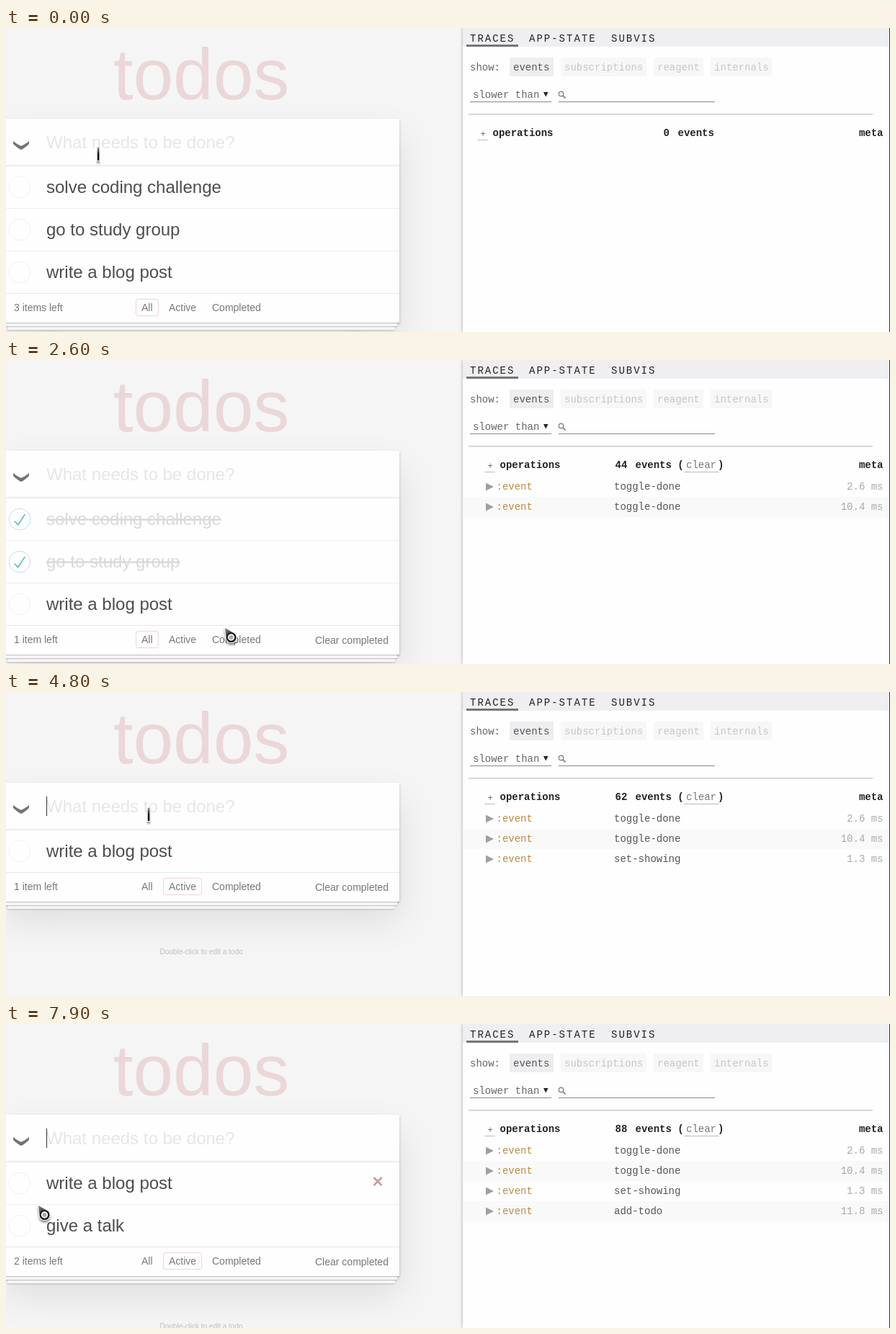
An HTML page that plays this animation: 1227x422 px, repeating every 8000 ms.

```html
<!DOCTYPE html>
<html lang="en">
<head>
<meta charset="utf-8">
<title>todos</title>
<style>
html, body { margin: 0; width: 100%; height: 100%; overflow: hidden; background: #f5f5f5; }
#stage { position: absolute; left: 0; top: 0; width: 1227px; height: 422px; overflow: hidden; background: #f5f5f5; }
#card { position: absolute; left: -4px; top: 126px; width: 550px; background: #fefefe;
  box-shadow: 0 2px 4px rgba(0,0,0,.2), 0 25px 50px rgba(0,0,0,.1); }
#card::before { content: ""; position: absolute; left: 0; right: 0; bottom: 0; height: 50px;
  box-shadow: 0 1px 1px rgba(0,0,0,.2), 0 8px 0 -3px #f6f6f6, 0 9px 1px -3px rgba(0,0,0,.2),
    0 16px 0 -6px #f6f6f6, 0 17px 2px -6px rgba(0,0,0,.2); }
#entry { position: relative; height: 65px; background: #fefefe; box-shadow: inset 0 -2px 1px rgba(0,0,0,.03); }
#panel { position: absolute; left: 634px; top: 0; width: 592px; height: 422px; background: #fefefe;
  border-right: 1px solid #333; box-shadow: 0 0 4px rgba(0,0,0,.35); }
#tabs { height: 26px; background: #efeef1; }
#rule { position: absolute; left: 7px; top: 110px; width: 563px; height: 9px;
  box-shadow: 0 2px 2px -1px rgba(0,0,0,.3); }
svg { position: absolute; left: 0; top: 0; }
text { font: 14px "Liberation Sans", Arial, sans-serif; white-space: pre; }
text.big { font-size: 24px; }
text.mono { font-family: "Liberation Mono", "Courier New", monospace; }
text.bold { font-weight: bold; }
</style>
</head>
<body>
<div id="stage">
  <div id="card"><div id="entry"></div></div>
  <div id="panel"><div id="tabs"></div><div id="rule"></div></div>
  <svg width="1227" height="422" viewBox="0 0 1227 422">
    <defs>
      <linearGradient id="drop" x1="0" y1="0" x2=".6" y2="1">
        <stop offset="0" stop-color="#8a8a8a"/><stop offset=".7" stop-color="#222"/>
      </linearGradient>
      <linearGradient id="beam" x1="0" y1="0" x2="0" y2="1">
        <stop offset="0" stop-color="#999"/><stop offset=".5" stop-color="#111"/>
      </linearGradient>
      <filter id="shade" x="-60%" y="-40%" width="220%" height="200%">
        <feDropShadow dx="0" dy="2.5" stdDeviation="1.5" flood-opacity=".5"/>
      </filter>
    </defs>
    <g id="fixed"></g>
    <g id="live"></g>
  </svg>
</div>
<script>
const LOOP = 8000, STEP = 100;
const $ = id => document.getElementById(id);

const text = (x, y, s, fill, cls = '', extra = '') =>
  `<text x="${x}" y="${y}" fill="${fill}" class="${cls}" ${extra}>${s}</text>`;
const mono = (x, y, s, fill, extra = '') => text(x, y, s, fill, 'mono', extra);
const bold = (x, y, s, extra = '') => text(x, y, s, '#222', 'mono bold', extra);
const rect = (x, y, w, h, fill, extra = '') =>
  `<rect x="${x}" y="${y}" width="${w}" height="${h}" fill="${fill}" ${extra}/>`;
const path = (d, fill, extra = '') => `<path d="${d}" fill="${fill}" ${extra}/>`;
const dots = (x1, x2) =>
  path(`M${x1} 155.5H${x2}`, 'none', 'stroke="#777" stroke-dasharray="1 1"');
const END = 'text-anchor="end"';

// Pointer moves: start, end, target
const moves = [
  [0, 700, 23, 224],
  [1000, 1600, 23, 280],
  [1800, 2300, 304, 372],
  [2600, 3100, 259, 390],
  [4100, 4600, 198, 170],
  [7400, 7900, 45, 252]
];
const traces = [
  [1000, 'toggle-done', '2.6 ms'],
  [1800, 'toggle-done', '10.4 ms'],
  [3500, 'set-showing', '1.3 ms'],
  [5400, 'add-todo', '11.8 ms']
];
const counts = [[0, 0], [1000, 22], [1800, 44], [3500, 62], [5000, 73], [5400, 88]];
const todos = [
  { name: 'solve coding challenge', done: 1000, to: 3500 },
  { name: 'go to study group', done: 1800, to: 3500 },
  { name: 'write a blog post' },
  { name: 'give a talk', from: 5400 }
];
const filters = [['All', 188, 180, 32], ['Active', 226, 218, 54], ['Completed', 286, 278, 84]];

function pointer(t) {
  let x = 128, y = 175;
  for (const [a, b, tx, ty] of moves) {
    const p = Math.min(1, Math.max(0, (t - a) / (b - a)));
    const e = p * p * (3 - 2 * p);
    x += (tx - x) * e;
    y += (ty - y) * e;
  }
  return { x, y, hot: y - 3 };
}

function drawFixed() {
  let s = text(148.7, 99, 'todos', '#ebd7d7', '', 'style="font-size:100px"');
  s += path('M10 157Q17 162.5 21 163.7Q25 162.5 32 157V161Q25 167.5 21 169Q17 167.5 10 161Z', '#737373');
  [['TRACES', 644], ['APP-STATE', 726], ['SUBVIS', 840]].forEach(([name, x]) => {
    s += mono(x, 19, name, '#222', 'letter-spacing="2"');
  });
  s += rect(639, 23, 72, 3, '#767676') + mono(644, 59, 'show:', '#666');
  [['events', 699, 61], ['subscriptions', 770, 119], ['reagent', 899, 69], ['internals', 978, 85]]
    .forEach(([name, x, w], i) => {
      s += rect(x, 41, w, 26, i ? '#f7f7f7' : '#eeeef0') + mono(x + 5, 59, name, i ? '#c6c6c6' : '#555');
    });
  s += mono(648, 97, 'slower than', '#666') + path('M746 89h6.5l-3.25 6.5z', '#222');
  s += rect(644, 102, 113, 1, '#888') + rect(767, 102, 217, 1, '#888');
  s += '<circle cx="770.5" cy="91.5" r="3.2" fill="none" stroke="#888" stroke-width="1.4"/>';
  s += path('M773 94l3.5 3.5', 'none', 'stroke="#888" stroke-width="1.8"');
  s += bold(1217.5, 150, 'meta', END);
  $('fixed').innerHTML = s;
}

function drawEntry(t) {
  const typed = t >= 5000 && t < 5400;
  let s = typed
    ? text(56, 167, 'give a talk', '#4d4d4d', 'big')
    : text(56, 167, 'What needs to be done?', '#e6e6e6', 'big', 'font-style="italic"');
  const lit = t >= 5400 ? Math.floor((t - 5400) / 600) % 2 === 0 : t >= 4800;
  if (lit) s += rect(typed ? 164 : 56, 145, 1, 27, '#333');
  return s;
}

function drawRow(todo, i, t, hover) {
  const top = 192 + 59 * i, mid = top + 29;
  const done = t >= todo.done;
  const fade = done ? [.28, .68, .89, 1][Math.min(3, (t - todo.done) / STEP)] : 0;
  const c = Math.round(77 + 140 * fade);
  let s = rect(0, top - 1, 546, 1, i ? '#ededed' : '#e6e6e6');
  s += `<g transform="translate(4.2 ${mid - 14.7}) scale(.2963)">` +
    `<circle cx="50" cy="50" r="50" fill="none" stroke="${done ? '#bddad5' : '#ededed'}" stroke-width="3"/>` +
    (done ? path('M72 25L42 71 27 56l-4 4 20 20 34-52z', '#5dc2af') : '') + '</g>';
  s += text(56, top + 37, todo.name, `rgb(${c},${c},${c})`, 'big', done ? 'text-decoration="line-through"' : '');
  if (hover) s += path(`M510.5 ${mid - 8}l11 11m0-11l-11 11`, 'none', 'stroke="#cc9a9a" stroke-width="2.6"');
  return s;
}

function drawFooter(t, n, left, ptr) {
  const top = 191 + 59 * n;
  let s = rect(0, top, 546, 1, '#e6e6e6');
  s += text(11, top + 25, `${left} item${left === 1 ? '' : 's'} left`, '#777');
  filters.forEach(([name, x, bx, w], i) => {
    const on = i === (t >= 3500 ? 1 : 0);
    const over = ptr.x >= bx && ptr.x < bx + w && ptr.hot >= top + 8 && ptr.hot < top + 32;
    if (on || over) {
      s += rect(bx + .5, top + 8.5, w - 1, 23, 'none',
        `rx="3" stroke="rgba(175,47,47,${on ? .2 : .1})"`);
    }
    s += text(x, top + 25, name, '#777');
  });
  if (t >= 1000) s += text(429, top + 26, 'Clear completed', '#777');
  s += text(213.5, top + 114, 'Double-click to edit a todo', '#bfbfbf', '', 'style="font-size:10px"');
  return s;
}

function drawTraces(t) {
  const rows = traces.filter(r => t >= r[0]);
  const layout = Math.min(2, rows.length);
  const op = [676, 688, 686][layout], num = [913, 851, 846][layout];
  const count = counts.filter(c => t >= c[0]).pop()[1];
  const ev = num + (count ? 28 : 20);
  let s = mono(op - 17.5, 151, '+', '#666', 'style="font-size:12px"') + dots(op - 21, op - 7);
  s += bold(op - .5, 150, 'operations') + bold(num - .5, 150, count);
  s += bold(ev - .5, 150, count ? 'events (' : 'events');
  if (count) {
    s += mono(ev + 70, 150, 'clear', '#777') + dots(ev + 68, ev + 115) + bold(ev + 114, 150, ')');
  }
  rows.forEach(([, name, ms], i) => {
    const y = 180 + 28 * i;
    if (i % 2) s += rect(634, y - 18, 592, 28, '#f9f9f9');
    s += path(`M${op - 20} ${y - 9.5}v11l11-5.5z`, '#a0a0a0');
    s += mono(op - 5.5, y, ':event', '#b98d4a') + mono(num - 2, y, name, '#555');
    s += mono(1217.5, y, ms, '#aaa', END);
  });
  return s;
}

function drawPointer(t, { x, y, hot }) {
  if (hot < 191) {
    return rect(x - 1.2, y - 9.5, 2.6, 18.5, 'url(#beam)',
      'stroke="#fff" stroke-width="2" paint-order="stroke" filter="url(#shade)"');
  }
  const scale = t >= 3300 && t < 3500 ? .92 : 1;
  return `<g transform="translate(${x} ${y}) scale(${scale})" filter="url(#shade)">` +
    path('M0 0L12 7A7 7 0 1 1 1.6 13.8Z', 'url(#drop)',
      'stroke="#fff" stroke-width="1.6" stroke-linejoin="round" paint-order="stroke"') +
    '<circle cx="8.5" cy="13" r="5.7" fill="#fff" stroke="#1a1a1a" stroke-width="2"/>' +
    '<circle cx="8.5" cy="13" r="3" fill="#aaa"/></g>';
}

function render(t) {
  const ptr = pointer(t);
  const list = todos.filter(d => t >= (d.from || 0) && t < (d.to || LOOP));
  const n = list.length, foot = 191 + 59 * n;
  const over = ptr.hot >= 192 && ptr.hot < foot ? Math.floor((ptr.hot - 192) / 59) : -1;
  const left = list.filter(d => !(t >= d.done)).length;
  $('card').style.height = foot + 41 - 126 + 'px';
  $('live').innerHTML = drawEntry(t) +
    list.map((d, i) => drawRow(d, i, t, i === over)).join('') +
    drawFooter(t, n, left, ptr) + drawTraces(t) + drawPointer(t, ptr);
}

let shown = -1;
const start = performance.now();
function tick() {
  const t = Math.floor((performance.now() - start) % LOOP / STEP) * STEP;
  if (t !== shown) render(shown = t);
  requestAnimationFrame(tick);
}
drawFixed();
tick();
</script>
</body>
</html>
```
